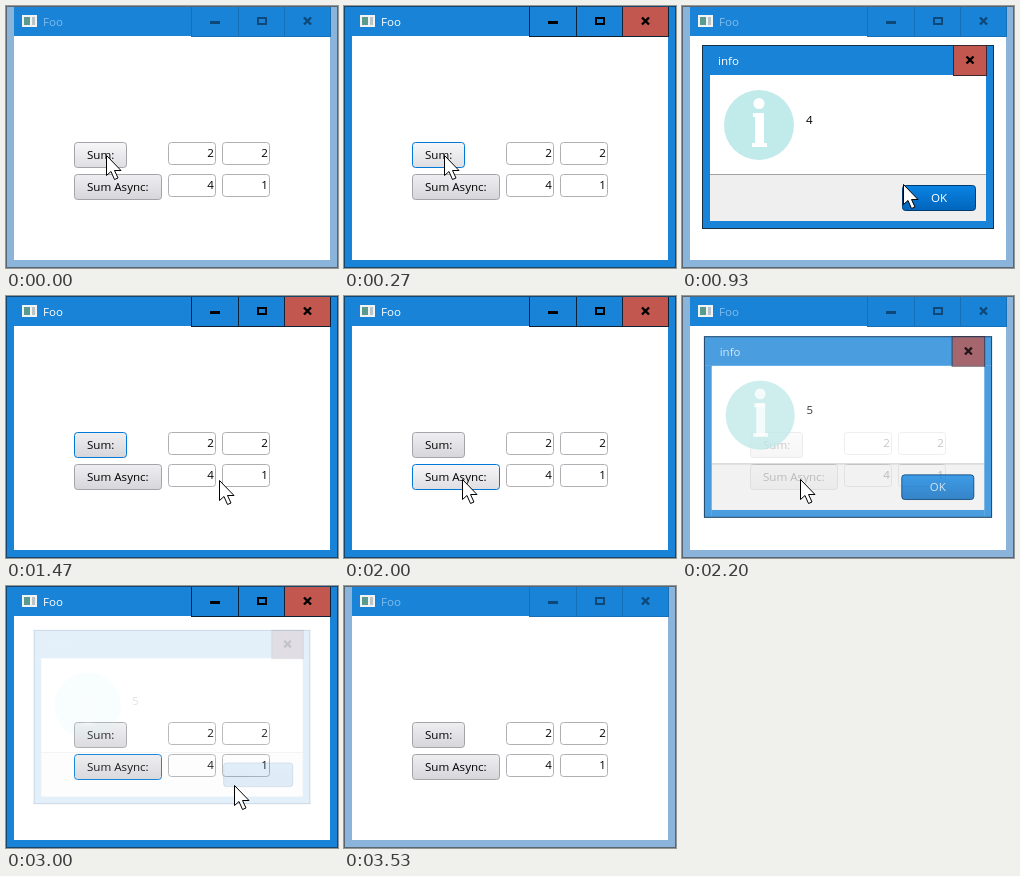
Recreate the animation shown at these times as an HTML page with a canvas. Size 332 px wide and 262 px high, loop 3.67 s.

```html
<!DOCTYPE html>
<html lang="en">
<head>
<meta charset="utf-8">
<title>Sum dialog</title>
<style>
  html, body { margin: 0; width: 100%; height: 100%; overflow: hidden; }
  canvas { display: block; width: 332px; height: 262px; }
</style>
</head>
<body>
<canvas id="stage" width="332" height="262"></canvas>
<script>
const ctx = document.getElementById('stage').getContext('2d');
const LOOP = 3670, FPS = 15;
const BLUE = '#1883d7', RED = '#c1574f';

// Cursor path: [tick, x, y]; ticks are 1/15 s
const cursorPath = [
  [0, 100, 149], [7, 100, 149], [8, 115, 149], [9, 142, 148], [10, 178, 151],
  [11, 214, 162], [12, 243, 174], [13, 231, 177], [14, 221, 178], [19, 221, 178],
  [22, 213, 184], [24, 176, 185], [26, 130, 183], [27, 118, 183], [34, 118, 183],
  [36, 151, 184], [38, 202, 185], [40, 226, 186], [44, 226, 186], [50, 240, 266]
];

// Two dialog runs: ticks of opening, closing and pressing OK
const dialogs = [
  { sum: '4', open: 5, fades: [.3, .62, .85, .97], press: 17, close: 19 },
  { sum: '5', open: 31, fades: [.25, .55, .78, .93], press: 41, close: 43 }
];
const closingFades = [.75, .4, .12];

function rect(x, y, w, h, color) {
  ctx.fillStyle = color;
  ctx.fillRect(x, y, w, h);
}

function frame(x, y, w, h, color) {
  ctx.strokeStyle = color;
  ctx.lineWidth = 1;
  ctx.strokeRect(x + .5, y + .5, w - 1, h - 1);
}

function text(str, x, y, color = '#000', align = 'left') {
  ctx.font = '11.6px "Open Sans", "Noto Sans", sans-serif';
  ctx.textAlign = align;
  ctx.fillStyle = color;
  ctx.fillText(str, x, y);
}

function roundBox(x, y, w, h, top, bottom, border) {
  const fill = ctx.createLinearGradient(0, y, 0, y + h);
  fill.addColorStop(0, top);
  fill.addColorStop(1, bottom);
  ctx.beginPath();
  ctx.roundRect(x + .5, y + .5, w - 1, h - 1, 3);
  ctx.fillStyle = fill;
  ctx.fill();
  ctx.strokeStyle = border;
  ctx.lineWidth = 1;
  ctx.stroke();
}

function cross(x, y, color) {
  ctx.strokeStyle = color;
  ctx.lineWidth = 2.4;
  ctx.beginPath();
  ctx.moveTo(x - 3.5, y - 3.5);
  ctx.lineTo(x + 3.5, y + 3.5);
  ctx.moveTo(x + 3.5, y - 3.5);
  ctx.lineTo(x - 3.5, y + 3.5);
  ctx.stroke();
}

function button(label, y, w, state) {
  const [top, bottom] = {
    hover: ['#f7f7f9', '#dedee2'],
    pressed: ['#cfcfd4', '#cfcfd4']
  }[state.look] || ['#efeff2', '#d6d6da'];
  roundBox(68, y, w, 26, top, bottom, state.focused ? '#0078d7' : '#a3a3a8');
  text(label, 81, y + 17);
}

function field(value, x, y) {
  roundBox(x, y, 48, 23, '#fff', '#fff', '#b0b0b4');
  text(value, x + 46, y + 15, '#000', 'right');
}

function mainWindow(active, sum, async) {
  rect(0, 0, 332, 262, active ? BLUE : '#8ab4da');
  rect(8, 1, 316, 29, BLUE);
  frame(0, 0, 332, 262, active ? '#17466d' : '#596672');

  rect(16, 9, 15, 12, '#f0f3f3');
  rect(18, 11, 6, 8, '#5b9a8e');
  rect(26, 11, 3, 8, '#b9c4c8');
  text('Foo', 37, 20, active ? '#fff' : '#82bdeb');

  const line = active ? '#0b2238' : '#1670b8';
  const glyph = active ? '#000' : '#0d4878';
  if (active) rect(279, 1, 45, 29, RED);
  for (const x of [185, 232, 278, 324]) rect(x, 1, 1, 30, line);
  rect(185, 30, 140, 1, line);
  rect(204, 15, 10, 3, glyph);
  ctx.strokeStyle = glyph;
  ctx.lineWidth = 2;
  ctx.strokeRect(252, 12, 8, 6);
  cross(301.5, 15, glyph);

  rect(8, 31, 316, 223, '#fff');
  rect(8, 30, 177, 1, '#fff');
  button('Sum:', 136, 53, sum);
  button('Sum Async:', 168, 88, async);
  field('2', 162, 136);
  field('2', 216, 136);
  field('4', 162, 168);
  field('1', 216, 168);
}

function infoIcon() {
  ctx.fillStyle = '#c1eaea';
  ctx.beginPath();
  ctx.arc(77, 119, 35, 0, 7);
  ctx.fill();
  ctx.fillStyle = '#fff';
  ctx.beginPath();
  ctx.arc(77, 97.5, 5.5, 0, 7);
  ctx.fill();
  rect(71, 107, 11, 4, '#fff');
  rect(73, 107, 9, 33, '#fff');
  rect(70, 137, 15, 4, '#fff');
}

function dialog(sum, alpha, pressed) {
  const scale = 1 - .06 * (1 - alpha);
  ctx.save();
  ctx.globalAlpha = alpha;
  ctx.translate(166, 131);
  ctx.scale(scale, scale);
  ctx.translate(-166, -131);

  // Fill each region once so that fading stays even
  rect(20, 39, 292, 30, BLUE);
  rect(20, 69, 8, 154, BLUE);
  rect(304, 69, 8, 154, BLUE);
  rect(28, 215, 276, 8, BLUE);
  frame(20, 39, 292, 184, '#17304a');
  text('info', 36, 59, '#fff');
  rect(272, 40, 32, 29, RED);
  frame(271, 39, 34, 31, '#3b2630');
  cross(288, 54, '#000');

  rect(28, 70, 276, 98, '#fff');
  rect(28, 168, 276, 1, '#a0a0a0');
  rect(28, 169, 276, 46, '#efefef');
  infoIcon();
  text(sum, 124, 118);
  roundBox(220, 179, 74, 26, pressed ? '#006cc6' : '#0b84e4',
    pressed ? '#006cc6' : '#0064bb', '#003c70');
  text('OK', 257, 196, '#fff', 'center');
  ctx.restore();
}

function cursor(tick) {
  const next = cursorPath.findIndex(p => p[0] > tick);
  if (next < 0) return;
  const [t0, x0, y0] = cursorPath[next - 1];
  const [t1, x1, y1] = cursorPath[next];
  const k = (tick - t0) / (t1 - t0);
  const x = Math.round(x0 + (x1 - x0) * k) + .5;
  const y = Math.round(y0 + (y1 - y0) * k) + .5;
  const arrow = [[0, 0], [0, 20], [4.5, 16], [8, 24], [11.5, 22.5], [8, 15], [14.5, 15]];
  ctx.beginPath();
  for (const [dx, dy] of arrow) ctx.lineTo(x + dx, y + dy);
  ctx.closePath();
  ctx.fillStyle = '#fff';
  ctx.fill();
  ctx.strokeStyle = '#000';
  ctx.lineWidth = 1;
  ctx.stroke();
}

function dialogAlpha(d, tick) {
  if (tick < d.open) return 0;
  if (tick >= d.close) return closingFades[tick - d.close] || 0;
  return d.fades[tick - d.open] ?? 1;
}

function render(ms) {
  const tick = Math.floor((ms + 4) * FPS / 1000) % 55;
  const within = (from, to) => tick >= from && tick < to;
  const active = within(2, 5) || within(19, 31) || within(43, 51);
  const sum = {
    look: within(2, 4) ? 'pressed' : within(0, 9) ? 'hover' : '',
    focused: active && tick < 28
  };
  const async = {
    look: within(28, 30) ? 'pressed' : within(25, 36) ? 'hover' : '',
    focused: active && tick >= 28
  };
  mainWindow(active, sum, async);
  for (const d of dialogs) {
    const alpha = dialogAlpha(d, tick);
    if (alpha) dialog(d.sum, alpha, within(d.press, d.press + 1));
  }
  cursor(tick);
}

const start = performance.now();
function loop() {
  render((performance.now() - start) % LOOP);
  requestAnimationFrame(loop);
}
loop();
</script>
</body>
</html>
```
